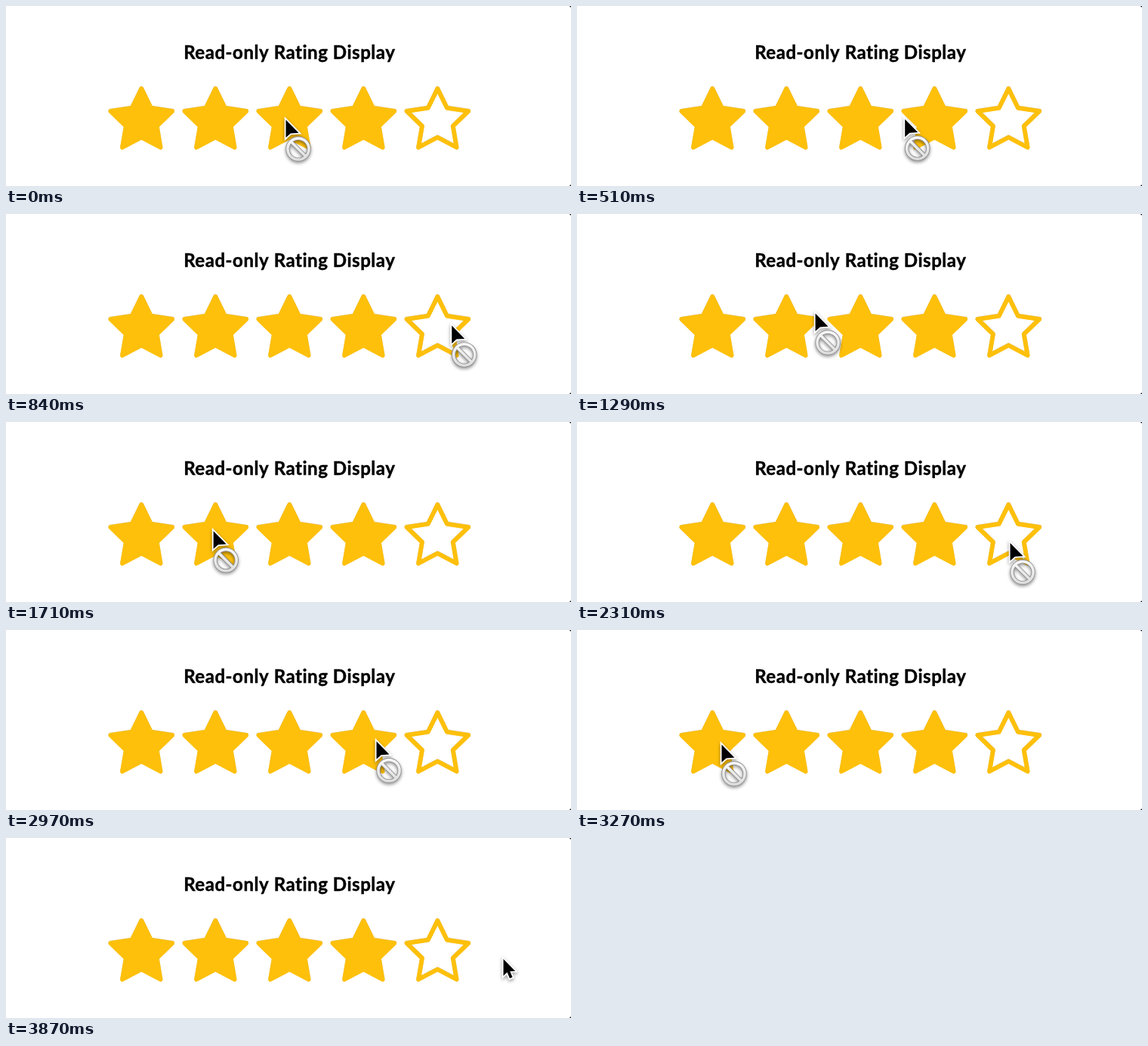
These frames come from a looping animation (748 by 238 pixels, 4.02 s). An HTML page with a canvas:

```html
<!DOCTYPE html>
<html lang="en">
<head>
<meta charset="utf-8">
<title>Read-only Rating Display</title>
<style>
  html, body { margin: 0; width: 100%; height: 100%; overflow: hidden; background: #fff; }
  canvas { display: block; width: 748px; height: 238px; }
</style>
</head>
<body>
<canvas id="stage" width="748" height="238"></canvas>
<script>
const ctx = document.getElementById('stage').getContext('2d');
const LOOP = 4020, STEP = 30;
const GOLD = '#fec00a', EDGE = '#dccba0';
const STAR_SIZE = 98, STAR_LEFT = 130.3, STAR_TOP = 101.2;
const HOVER_END = 620;

const star = new Path2D('M12 2l3.09 6.26L22 9.27l-5 4.87 1.18 6.88L12 17.77l-6.18 3.25L7 14.14 2 9.27l6.91-1.01z');
const arrow = new Path2D('M0 0V22.2L5 17.6L8.4 25.6L12 24.1L8.7 16.3L15.6 15.9Z');
const arrowHead = new Path2D('M0 0V23.6L6.2 18L17 17.3Z');

// Sweeps between resting points; skew shifts the speed, lift arches the path
const rest = { x: 368, y: 148 };
const sweeps = [
  { from: 300, to: 900, x: 594, y: 145, lift: 0, skew: 1 },
  { from: 900, to: 1500, x: 144, y: 149, lift: 21, skew: 1.25 },
  { from: 1500, to: 2310, x: 571, y: 157.5, lift: 14, skew: 0.75 },
  { from: 2880, to: 3390, x: 155, y: 151, lift: 28, skew: 0.72 },
  { from: 3450, to: 3870, x: 656, y: 157.5, lift: 8, skew: 1 }
];

function ease(u) {
  return u * u * (3 - 2 * u);
}

function pointer(t) {
  let { x, y } = rest;
  for (const s of sweeps) {
    if (t <= s.from) break;
    const u = Math.min(1, (t - s.from) / (s.to - s.from));
    const e = ease(u ** s.skew);
    x += (s.x - x) * e;
    y += (s.y - y) * e - s.lift * (4 * e * (1 - e)) ** 2;
  }
  return { x, y };
}

function shadow(blur, y, alpha) {
  ctx.shadowColor = `rgba(0,0,0,${alpha})`;
  ctx.shadowBlur = blur;
  ctx.shadowOffsetY = y;
}

function stroke(path, width, color) {
  ctx.lineWidth = width;
  ctx.strokeStyle = color;
  ctx.stroke(path);
}

function drawStar(i, filled) {
  ctx.save();
  ctx.translate(STAR_LEFT + i * STAR_SIZE, STAR_TOP);
  ctx.scale(STAR_SIZE / 24, STAR_SIZE / 24);
  ctx.lineJoin = 'round';
  ctx.translate(0, -0.12);
  stroke(star, 1.42, EDGE);
  ctx.translate(0, 0.12);
  stroke(star, 1.42, GOLD);
  if (filled) {
    ctx.fillStyle = GOLD;
    ctx.fill(star);
  }
  ctx.restore();
}

const badge = new Path2D();
badge.arc(0, 0, 14.1, 0, Math.PI * 2);
badge.moveTo(-9.5, -9.5);
badge.lineTo(9.5, 9.5);

function drawBadge(x, y) {
  ctx.save();
  ctx.translate(x, y);
  ctx.save();
  shadow(4, 2, 0.45);
  stroke(badge, 5.2, '#8f8f8f');
  ctx.restore();
  const light = ctx.createLinearGradient(0, -16, 0, 16);
  light.addColorStop(0, '#fafafa');
  light.addColorStop(1, '#dcdcdc');
  stroke(badge, 3.5, light);
  ctx.restore();
}

function drawArrow(path, x, y) {
  ctx.save();
  ctx.translate(x, y);
  ctx.save();
  shadow(4, 2, 0.4);
  stroke(path, 3.6, '#fff');
  ctx.restore();
  ctx.fillStyle = '#000';
  ctx.fill(path);
  ctx.restore();
}

function drawCorner(y, dir) {
  ctx.beginPath();
  ctx.moveTo(748, y);
  ctx.lineTo(745.5, y);
  ctx.lineTo(748, y + dir * 2);
  ctx.fillStyle = '#333';
  ctx.fill();
}

function drawTitle(text, x, y) {
  ctx.font = 'bold 24px Lato, "Open Sans", sans-serif';
  ctx.letterSpacing = '0.55px';
  ctx.textAlign = 'center';
  ctx.fillStyle = ctx.strokeStyle = '#000';
  ctx.lineWidth = 0.45;
  ctx.fillText(text, x, y);
  ctx.strokeText(text, x, y);
}

function draw(t) {
  ctx.fillStyle = '#fff';
  ctx.fillRect(0, 0, 748, 238);
  drawCorner(0, 1);
  drawCorner(238, -1);
  drawTitle('Read-only Rating Display', 375.3, 70);
  for (let i = 0; i < 5; i++) drawStar(i, i < 4);

  const { x, y } = pointer(t);
  const blocked = x < HOVER_END;
  drawArrow(blocked ? arrowHead : arrow, x + 2.5, y + 2.5);
  if (blocked) drawBadge(x + 19, y + 41);
}

const start = performance.now();
function tick() {
  const t = (performance.now() - start) % LOOP;
  draw(Math.floor(t / STEP) * STEP);
  requestAnimationFrame(tick);
}
tick();
</script>
</body>
</html>
```
